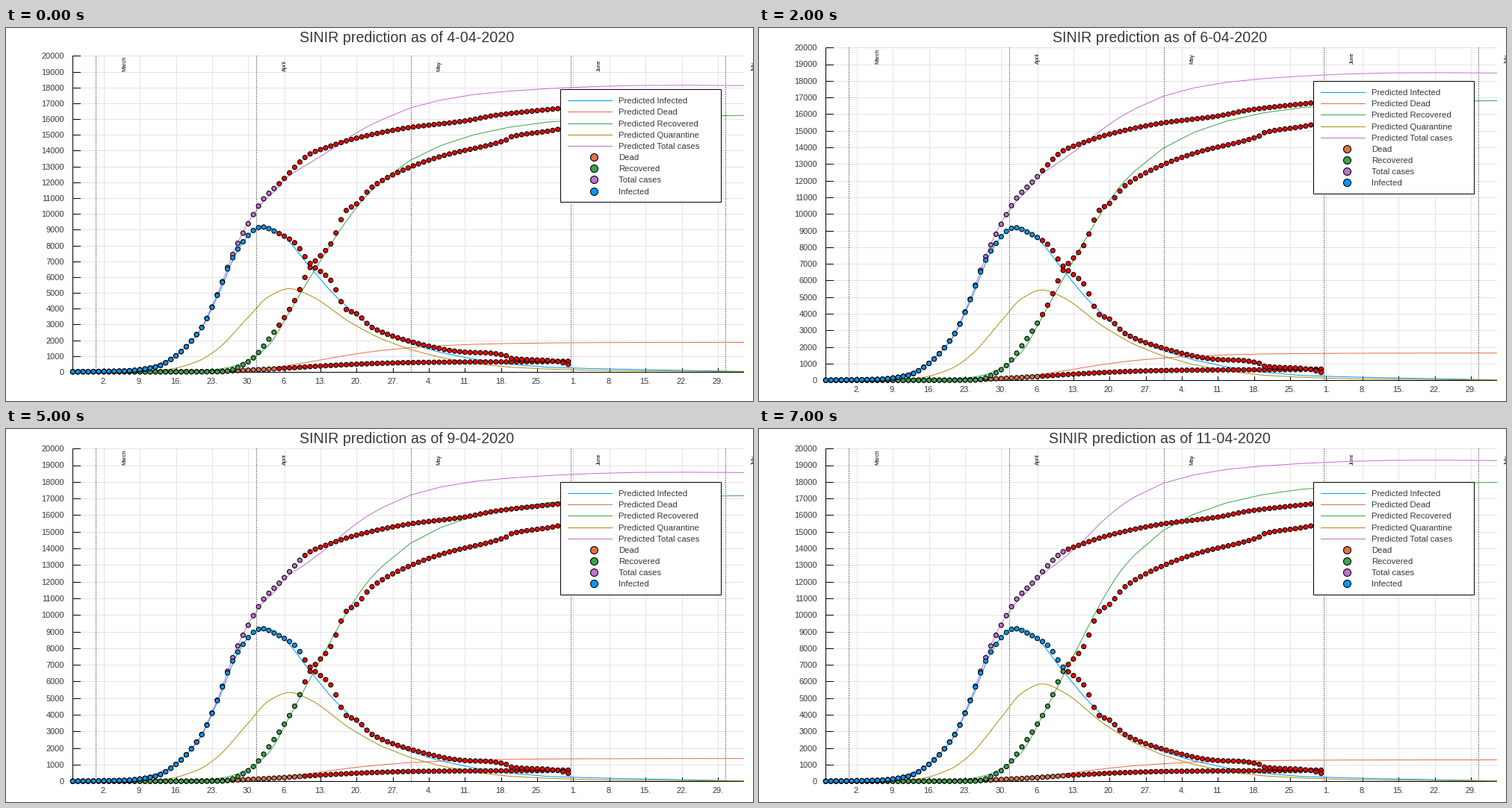
Animation of 1000x500 px, one loop 8000 ms. Source, as a matplotlib script:

```python
import numpy as np
import matplotlib.pyplot as plt
from matplotlib.animation import FuncAnimation
from matplotlib.patches import Rectangle

W, H, DPI = 1000, 500, 100
PT = 72 / DPI
LEFT, RIGHT, SPAN = 90, 988, 130
SHIFT = 0.6  # pixel centres to pixel edges
BLUE, ORANGE, GREEN = "#009afa", "#e26f46", "#3da44d"
PURPLE, GOLD, RED = "#c271d2", "#ac8d18", "#ff0000"
INK, GRID_GREY = "#383838", "#e4e4e4"
plt.rcParams["font.family"] = "Liberation Sans"


def through(x, *keys):
    """Monotone Hermite curve through a few (day, value) keys."""
    kx, ky = np.array(keys, float).T
    x = np.clip(x, kx[0], kx[-1])
    s = np.diff(ky) / np.diff(kx)
    prod = s[:-1] * s[1:]
    m = np.where(prod > 0, 2 * prod / (s[:-1] + s[1:] + 1e-9), 0)
    m = np.r_[s[0], m, s[-1]]
    i = np.clip(np.searchsorted(kx, x, "right") - 1, 0, len(kx) - 2)
    h = kx[i + 1] - kx[i]
    t = (x - kx[i]) / h
    return (ky[i] + (ky[i + 1] - ky[i]) * t * t * (3 - 2 * t)
            + h * t * (1 - t) * (m[i] * (1 - t) - m[i + 1] * t))


# Reported counts, day 0 is 25 February
DAY = np.arange(97)
total = through(DAY, (0, 2), (10, 55), (16, 302), (20, 1018), (25, 2814),
                (28, 4876), (31, 7430), (34, 9377), (37, 10950), (40, 11907),
                (46, 13795), (49, 14180), (55, 14795), (65, 15452),
                (76, 15882), (82, 16242), (96, 16731))
recovered = through(DAY, (24, 0), (29, 9), (34, 636), (39, 2507), (43, 4512),
                    (46, 6604), (50, 8098), (53, 10214), (55, 10631),
                    (58, 11694), (65, 12907), (72, 13698), (84, 14678),
                    (85, 14882), (94, 15347), (96, 15593))
dead = through(DAY, (15, 0), (26, 16), (34, 108), (40, 204), (48, 368),
               (58, 522), (66, 589), (75, 618), (92, 645), (93, 668), (96, 668))
infected = total - recovered - dead

# Model curves: dense at first, then in growing solver steps
GRID = np.r_[np.arange(0, 60, 0.5), np.geomspace(60, SPAN, 10)]
sick = through(GRID, (0, 5), (12, 128), (18, 670), (24, 2300), (28, 4740),
               (32, 7700), (35, 8950), (37, 9230), (40, 8820), (46, 6620),
               (51, 4780), (58, 2880), (66, 1720), (77, 840), (92, 290),
               (130, 25))
healed = through(GRID, (15, 0), (24, 35), (30, 265), (34, 725), (38, 1705),
                 (42, 3800), (46, 5980), (54, 9980), (58, 11510), (66, 13500),
                 (77, 14950), (92, 15810), (112, 16150), (130, 16232))
isolated = through(GRID, (0, 2), (12, 25), (18, 130), (24, 640), (28, 1430),
                   (34, 3450), (38, 4770), (42, 5264), (46, 4830), (54, 3090),
                   (62, 1790), (71, 930), (84, 310), (101, 95), (130, 15)) / 5264
dying = np.exp(-np.exp(-0.087 * (GRID - 46.8)))
extra = 1 / (1 + np.exp(-0.25 * (GRID - 51.5)))

# Levels reached by each day's prediction, 4 to 11 April
HEALED_END = [16232, 16740, 16807, 16830, 16851, 17165, 17570, 17969]
DEAD_END = [1865, 1762, 1637, 1530, 1435, 1368, 1325, 1287]
ISOLATED_PEAK = [5264, 5547, 5426, 5290, 5157, 5336, 5600, 5852]

MONTHS = [("March", 4.5), ("April", 35.5), ("May", 65.5), ("June", 96.5),
          ("July", 126.5)]
WEEKS = [2, 9, 16, 23, 30, 6, 13, 20, 27, 4, 11, 18, 25, 1, 8, 15, 22, 29]
LINES = [("Infected", BLUE), ("Dead", ORANGE), ("Recovered", GREEN),
         ("Quarantine", GOLD), ("Total cases", PURPLE)]
DOTS = [("Dead", ORANGE, dead), ("Recovered", GREEN, recovered),
        ("Total cases", PURPLE, total), ("Infected", BLUE, infected)]

fig = plt.figure(figsize=(W / DPI, H / DPI), dpi=DPI, facecolor="white")
ax = fig.add_axes([0, 0, 1, 1])


def px(day):
    return LEFT + np.asarray(day) * (RIGHT - LEFT) / SPAN


def line(x, y, color, **kw):
    ax.plot(x, y, color=color, lw=PT, **kw)


def dots(x, y, colors, size, **kw):
    ax.scatter(x, y, s=(size * PT) ** 2, c=colors, edgecolors="black",
               linewidths=1.1 * PT, **kw)


def label(x, y, text, size, color=INK, **kw):
    kw.setdefault("va", "center_baseline")
    ax.text(x, y, text, fontsize=size * PT, color=color, **kw)


def draw_axes(top, bottom, py):
    for week, name in enumerate(WEEKS):
        x = px(6 + 7 * week)
        line([x, x], [top, bottom], GRID_GREY, zorder=1)
        line([x, x], [bottom, bottom - 5], "black", zorder=2)
        label(x, bottom + 11.7, f"{name}.", 11, ha="center")
    for value in range(0, 20001, 1000):
        y = py(value)
        line([LEFT, RIGHT], [y, y], GRID_GREY, zorder=1)
        line([LEFT, LEFT + 10], [y, y], "black", zorder=2)
        label(78.5, y, str(value), 11, ha="right")
    line([LEFT, LEFT, RIGHT], [top, bottom, bottom], "black", zorder=2)
    for name, day in MONTHS:
        x = px(day)
        line([x, x], [top, bottom], "black", zorder=2, ls=(0, (1, 2)),
             dash_capstyle="butt")
        label(x + 38.5, py(19000) - 1, name, 7.3, "black", rotation=90,
              ha="center", va="bottom")


def draw_legend(top):
    ax.add_patch(Rectangle((743, top), 215, 151, fc="white", ec="black",
                           lw=PT, zorder=6))
    rows = iter(top + 15.15 * np.arange(1, 10))
    for name, color in LINES:
        y = next(rows)
        line([753, 812], [y, y], color, zorder=7)
        label(821, y, "Predicted " + name, 11.4, zorder=7)
    for name, color, _ in DOTS:
        y = next(rows)
        dots([787.5], [y], [color], 10, zorder=7)
        label(821, y, name, 11.4, zorder=7)


def draw(step):
    ax.clear()
    ax.set(xlim=(SHIFT, W + SHIFT), ylim=(H + SHIFT, SHIFT))
    ax.axis("off")
    top, bottom = (38, 461.5) if step == 0 else (26.8, 472.8)

    def py(value):
        return bottom - np.asarray(value) * (bottom - top) / 20000

    draw_axes(top, bottom, py)
    label(537.5, 11.7, f"SINIR prediction as of {step + 4}-04-2020", 19.65,
          ha="center")

    deaths = dying * DEAD_END[step]
    cured = healed + extra * (HEALED_END[step] - HEALED_END[0])
    curves = [sick, deaths, cured, isolated * ISOLATED_PEAK[step],
              sick + deaths + cured]
    for values, (_, color) in zip(curves, LINES):
        line(px(GRID), py(values), color, zorder=3)

    known = 40 + step
    for _, color, values in DOTS:
        colors = [color] * known + [RED] * (len(DAY) - known)
        dots(px(DAY), py(values), colors, 6, zorder=4)

    draw_legend(top + 44.8)
    return []


anim = FuncAnimation(fig, draw, frames=8, interval=1000, repeat=True,
                     repeat_delay=0, init_func=lambda: [], blit=False)
plt.show()
```
